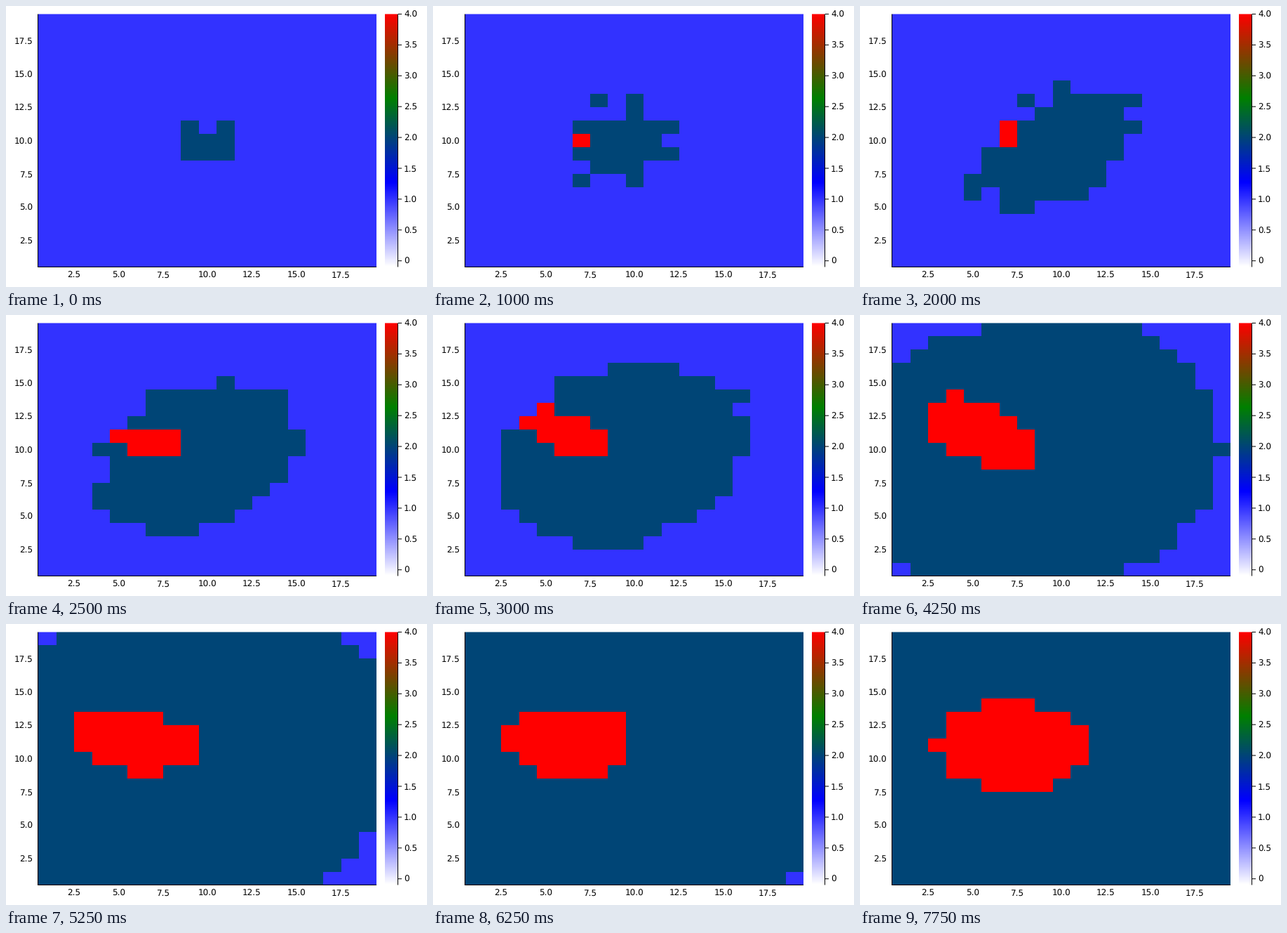
Animation, 600 px wide and 400 px high, one loop 8 s. Source, as a matplotlib script:

```python
import numpy as np
import matplotlib.pyplot as plt
from matplotlib.animation import FuncAnimation
from matplotlib.colors import LinearSegmentedColormap
from matplotlib.patches import Rectangle

W, H, DPI = 600, 400, 100
N, FRAMES, INTERVAL = 19, 32, 250
LEFT, RIGHT, TOP, BOTTOM = 46, 528, 11, 371
VMIN, VMAX = -0.1, 4.0
BLUE, TEAL, RED = 1, 2, 4

rng = np.random.default_rng(7)
ragged = rng.uniform(-1.7, 1.7, (N, N))
row, col = np.mgrid[1:N + 1, 1:N + 1]

# Growing ellipses: step, centre x, centre y, radius along, radius across, tilt
TEAL_KEYS = np.array([
    (0, 10, 10, 1.5, 1.5, 45),
    (4, 9.6, 9.8, 3.3, 2.7, 45),
    (8, 9.6, 9.3, 5.4, 3.4, 45),
    (12, 9.4, 9.6, 7.7, 6.25, 45),
    (17, 8.4, 9.4, 11.1, 10, 45),
    (25, 8.4, 9.4, 16, 13.05, 45),
    (31, 8.4, 9.4, 17, 14.5, 45),
])
RED_KEYS = np.array([
    (0, 6.5, 10.5, 0.3, 0.3, 0),
    (4, 7, 10, 0.6, 0.6, 0),
    (8, 7, 10.5, 0.7, 0.7, 0),
    (12, 6.2, 11.1, 2.7, 1.6, -35),
    (17, 5.4, 11.45, 3.77, 2.1, -31),
    (25, 6.31, 11.24, 3.7, 2.6, 0),
    (31, 7.32, 10.9, 4.35, 3.33, 0),
])


def reach(keys, step):
    """Distance of every cell from the ellipse centre; 1 is the rim."""
    cx, cy, along, across, tilt = (np.interp(step, keys[:, 0], k) for k in keys[:, 1:].T)
    c, s = np.cos(np.radians(tilt)), np.sin(np.radians(tilt))
    dx, dy = col - cx, row - cy
    return np.hypot((dx * c + dy * s) / along, (dy * c - dx * s) / across)


def cells_at(step):
    cells = np.full((N, N), BLUE)
    if step == 0:
        # Starting colony: a 3 x 3 block with a notch
        cells[8:11, 8:11] = TEAL
        cells[10, 9] = BLUE
        return cells
    roughness = 0.5 * np.exp(-step / 5)
    cells[reach(TEAL_KEYS, step) + roughness * ragged < 1] = TEAL
    cells[reach(RED_KEYS, step) < 1] = RED
    return cells


cmap = LinearSegmentedColormap.from_list("heat", ["white", "blue", "green", "red"], N=1024)

plt.rcParams["font.family"] = "DejaVu Sans"
plt.rcParams["text.hinting"] = "none"
fig = plt.figure(figsize=(W / DPI, H / DPI), dpi=DPI, facecolor="white")
ax = fig.add_axes([0, 0, 1, 1])
ax.axis("off")


def bar(x, y, w, h, color="black", alpha=1):
    ax.add_patch(Rectangle((x, y), w, h, fc=color, lw=0, alpha=alpha,
                           snap=False, zorder=3))


def label(x, y, text, align):
    ax.text(x, y + 4.4, text, ha=align, va="baseline", fontsize=12 * 72 / DPI)


# Heatmap on whole-pixel cell edges
k = np.arange(N + 1)
x_edges = np.ceil(LEFT + k * (RIGHT - LEFT) / N)
y_edges = np.ceil(BOTTOM - k * (BOTTOM - TOP) / N)
mesh = ax.pcolormesh(x_edges, y_edges, cells_at(0), cmap=cmap, vmin=VMIN, vmax=VMAX,
                     antialiased=False, linewidth=0, zorder=2)

# Colour bar
ramp = np.linspace(VMAX, VMIN, BOTTOM - TOP)[:, None]
ax.imshow(ramp, cmap=cmap, vmin=VMIN, vmax=VMAX, extent=(540, 558, BOTTOM, TOP),
          aspect="auto", interpolation="nearest", zorder=2)

# Soft top edge, then the axis lines
bar(LEFT, TOP, 558 - LEFT, 1, "white", 0.5)
bar(45, BOTTOM, RIGHT - 45, 1)
bar(45, TOP + 0.5, 1, BOTTOM - TOP + 0.5)
bar(558, TOP + 0.5, 1, BOTTOM - TOP)

for v in np.arange(2.5, 18, 2.5):
    along = (v - 0.5) / N
    label(LEFT + along * (RIGHT - LEFT), 382.6, f"{v:.1f}", "center")
    label(38.5, BOTTOM + 1 - along * (BOTTOM - TOP), f"{v:.1f}", "right")

for v in np.arange(0, 4.1, 0.5):
    y = BOTTOM + 0.5 - (v - VMIN) / (VMAX - VMIN) * (BOTTOM - TOP)
    bar(559, y - 0.5, 5, 1)
    label(567, y + 0.2, f"{v:.1f}" if v else "0", "left")

ax.set_xlim(0, W)
ax.set_ylim(H, 0)


def update(i):
    mesh.set_array(cells_at(i))
    return [mesh]


anim = FuncAnimation(fig, update, frames=FRAMES, interval=INTERVAL,
                     repeat=True, repeat_delay=0, blit=False)
plt.show()
```
